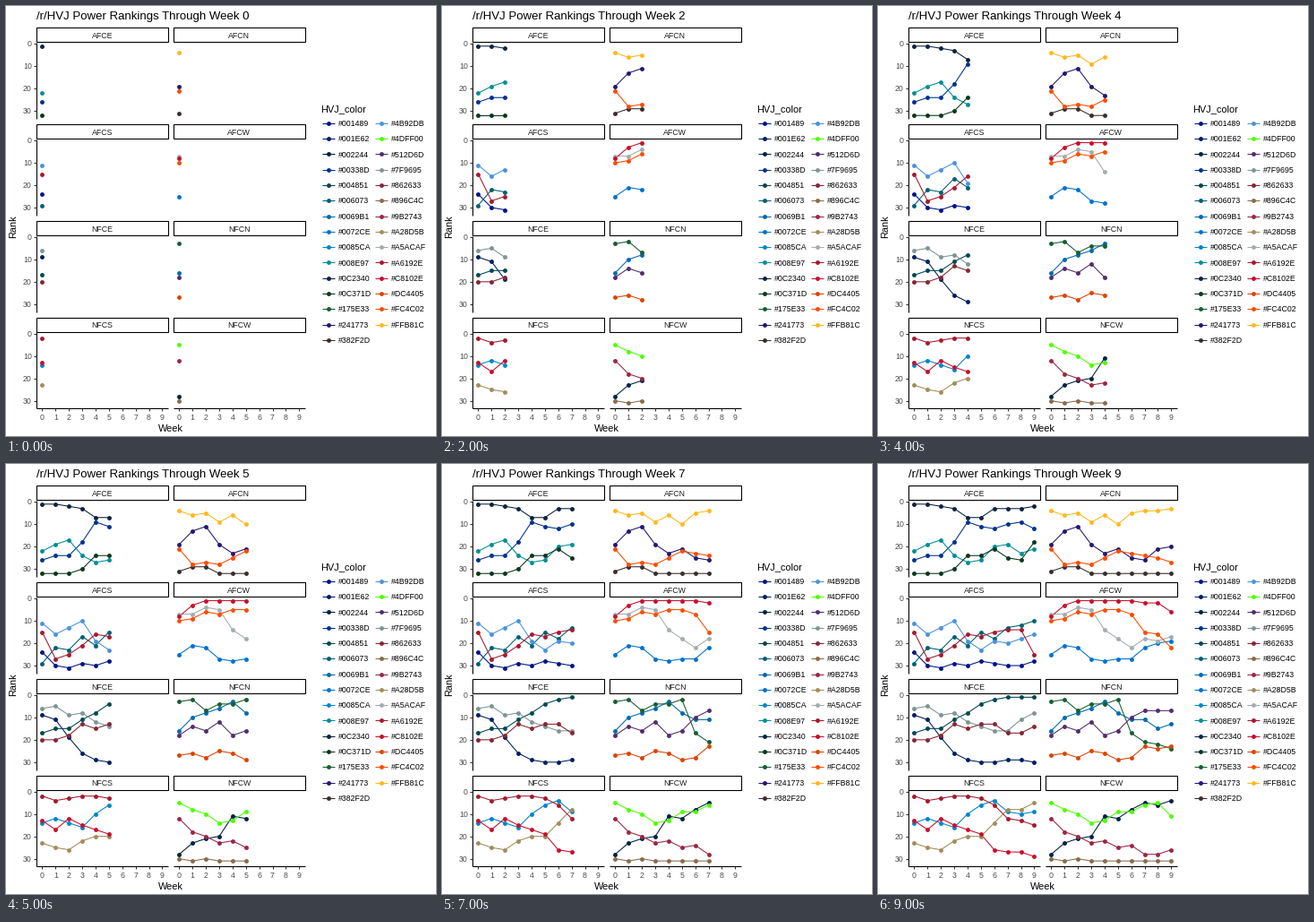
Write a matplotlib script that moves like this. It is 480 px wide and 480 px high and loops after 10 s.

```python
import matplotlib.pyplot as plt
from matplotlib.animation import FuncAnimation
from matplotlib.patches import Rectangle

plt.rcParams["font.family"] = "Liberation Sans"

SIZE, DPI = 480, 100
PT = 72 / DPI                      # points per pixel
WEEKS = 10
LEFT, PANEL_W, PANEL_H = 33.7, 147.4, 85.2
TOP, GAP, ROW_STEP, STRIP_H = 40.9, 5.5, 107.8, 17.1
X_STEP = PANEL_W / 1.1 / (WEEKS - 1)
Y_STEP = PANEL_H / 34.1
DIVISIONS = ["AFCE", "AFCN", "AFCS", "AFCW", "NFCE", "NFCN", "NFCS", "NFCW"]

fig = plt.figure(figsize=(SIZE / DPI, SIZE / DPI), dpi=DPI, facecolor="white")
ax = fig.add_axes([0, 0, 1, 1])
ax.set_xlim(0, SIZE)
ax.set_ylim(SIZE, 0)
ax.axis("off")


def label(x, y, text, px, color="black", ha="left", **kw):
    return ax.text(x, y, text, fontsize=px * PT, color=color, ha=ha,
                   va="baseline", **kw)


def rule(xs, ys, color="black"):
    ax.plot(xs, ys, color=color, lw=1.07 * PT, solid_capstyle="butt")


def origin(division):
    """Top left corner of a division's panel."""
    row, col = divmod(DIVISIONS.index(division), 2)
    return LEFT + col * (PANEL_W + GAP), TOP + row * ROW_STEP


def week_x(left, week):
    return left + PANEL_W * 0.05 / 1.1 + week * X_STEP


def rank_y(top, rank):
    return top + (rank + 0.55) * Y_STEP


def draw_panel(division):
    left, top = origin(division)
    ax.add_patch(Rectangle((left + 0.5, top - STRIP_H + 0.5),
                           PANEL_W - 1, STRIP_H - 1, fc="white", ec="black",
                           lw=1.1 * PT, joinstyle="miter"))
    label(left + PANEL_W / 2, top - 4.9, division, 8.8, "#1A1A1A", "center")
    bottom = top + PANEL_H
    if left == LEFT:
        rule([left, left], [top, bottom])
        for rank in range(0, 31, 10):
            y = rank_y(top, rank)
            rule([left - 2.75, left], [y, y], "#333333")
            label(left - 4.95, y + 3.2, str(rank), 8.8, "#4D4D4D", "right")
    if division in DIVISIONS[-2:]:
        rule([left, left + PANEL_W], [bottom, bottom])
        for week in range(WEEKS):
            x = week_x(left, week)
            rule([x, x], [bottom, bottom + 2.75], "#333333")
            label(x, bottom + 12.2, str(week), 8.8, "#4D4D4D", "center")


teams = []


def team(division, color, *ranks):
    left, top = origin(division)
    xs = [week_x(left, w) for w in range(WEEKS)]
    ys = [rank_y(top, r) for r in ranks]
    teams.append((color, xs, ys))


team("AFCE", "#0C2340", 1, 1, 2, 3, 7, 7, 3, 3, 3, 2)
team("AFCE", "#008E97", 22, 19, 17, 24, 27, 26, 20, 19, 23, 21)
team("AFCE", "#00338D", 26, 24, 24, 18, 9, 11, 12, 10, 9, 12)
team("AFCE", "#0C371D", 32, 32, 32, 30, 24, 24, 21, 25, 26, 18)

team("AFCN", "#FFB81C", 4, 6, 5, 9, 6, 10, 5, 4, 4, 3)
team("AFCN", "#241773", 19, 13, 11, 19, 23, 21, 25, 26, 21, 20)
team("AFCN", "#FC4C02", 21, 28, 27, 28, 25, 22, 23, 24, 25, 27)
team("AFCN", "#382F2D", 31, 29, 29, 32, 32, 32, 32, 32, 32, 32)

team("AFCS", "#4B92DB", 11, 16, 13, 10, 19, 23, 19, 20, 18, 16)
team("AFCS", "#A6192E", 15, 27, 25, 21, 16, 17, 15, 14, 14, 25)
team("AFCS", "#001489", 24, 30, 31, 29, 30, 28, 29, 30, 30, 28)
team("AFCS", "#006073", 29, 22, 23, 17, 21, 15, 18, 13, 12, 10)

team("AFCW", "#A5ACAF", 7, 7, 4, 5, 14, 18, 22, 18, 19, 17)
team("AFCW", "#C8102E", 8, 3, 1, 1, 1, 1, 1, 2, 2, 6)
team("AFCW", "#FC4C02", 10, 9, 6, 7, 5, 5, 7, 15, 16, 22)
team("AFCW", "#0072CE", 25, 21, 22, 27, 28, 27, 27, 22, 20, 19)

team("NFCE", "#7F9695", 6, 5, 9, 8, 12, 14, 16, 16, 11, 8)
team("NFCE", "#001E62", 9, 11, 19, 26, 29, 30, 30, 29, 29, 30)
team("NFCE", "#004851", 17, 15, 15, 11, 8, 4, 2, 1, 1, 1)
team("NFCE", "#862633", 20, 20, 18, 13, 15, 13, 13, 17, 17, 14)

team("NFCN", "#175E33", 3, 2, 7, 4, 4, 2, 17, 21, 22, 24)
team("NFCN", "#0069B1", 16, 10, 8, 6, 3, 8, 11, 11, 15, 13)
team("NFCN", "#512D6D", 18, 14, 16, 12, 18, 16, 10, 7, 7, 7)
team("NFCN", "#DC4405", 27, 26, 28, 25, 26, 29, 28, 23, 24, 23)

team("NFCS", "#A6192E", 2, 4, 3, 2, 2, 3, 6, 12, 13, 15)
team("NFCS", "#C8102E", 13, 17, 12, 15, 17, 19, 26, 27, 27, 29)
team("NFCS", "#0085CA", 14, 12, 14, 16, 10, 6, 4, 9, 10, 9)
team("NFCS", "#A28D5B", 23, 25, 26, 22, 20, 20, 14, 8, 8, 5)

team("NFCW", "#4DFF00", 5, 8, 10, 14, 13, 9, 9, 6, 5, 11)
team("NFCW", "#9B2743", 12, 18, 20, 23, 22, 25, 24, 28, 28, 26)
team("NFCW", "#002244", 28, 23, 21, 20, 11, 12, 8, 5, 6, 4)
team("NFCW", "#896C4C", 30, 31, 30, 31, 31, 31, 31, 31, 31, 31)

teams.sort(key=lambda t: t[0])


def series(color):
    """Empty line and marker artists in one colour."""
    line, = ax.plot([], [], color=color, lw=1.07 * PT, zorder=3,
                    solid_capstyle="butt")
    dots, = ax.plot([], [], "o", color=color, ms=4.9 * PT, mew=0, zorder=4)
    return line, dots


def draw_legend():
    label(351, 118, "HVJ_color", 11)
    colors = sorted({color for color, _, _ in teams})
    for i, color in enumerate(colors):
        col, row = divmod(i, 15)
        x, y = 359.7 + col * 59.4, 130.9 + row * 17.28
        line, dot = series(color)
        line.set_data([x - 6.9, x + 6.9], [y, y])
        dot.set_data([x], [y])
        label(x + 10.8, y + 3.2, color, 8.8)


for name in DIVISIONS:
    draw_panel(name)
draw_legend()
label(184, 475, "Week", 11, ha="center")
ax.text(13, 246, "Rank", fontsize=11 * PT, rotation=90, ha="right",
        va="center")
title = label(LEFT, 15, "", 13.2)
artists = [series(color) for color, _, _ in teams]


def update(week):
    title.set_text(f"/r/HVJ Power Rankings Through Week {week}")
    n = week + 1
    for (line, dots), (_, xs, ys) in zip(artists, teams):
        line.set_data(xs[:n], ys[:n])
        dots.set_data(xs[:n], ys[:n])
    return [title]


anim = FuncAnimation(fig, update, frames=WEEKS, interval=1000,
                     init_func=lambda: update(0), repeat=True,
                     repeat_delay=0, blit=False)
plt.show()
```
